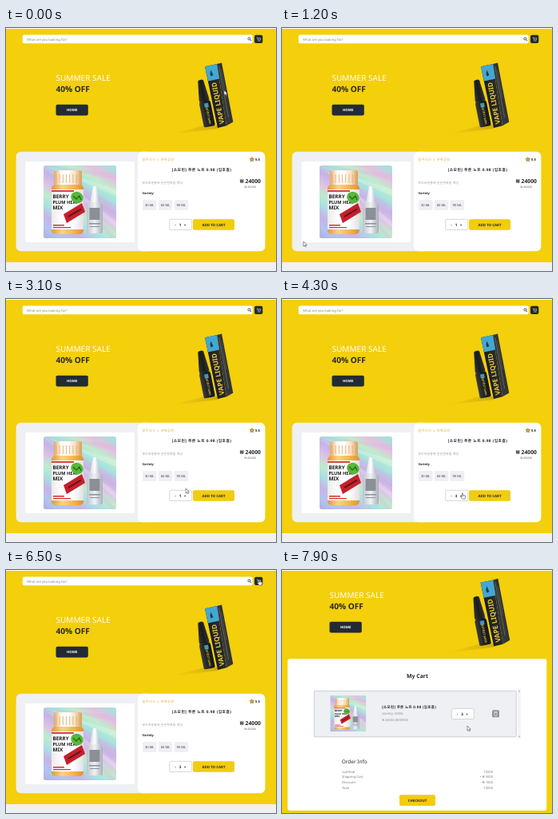
An HTML page with a canvas for the animation above (8 s loop, 338x304 px).

```html
<!DOCTYPE html>
<html lang="ko">
<head>
<meta charset="utf-8">
<title>Shop demo</title>
<style>
html, body { margin: 0; width: 338px; height: 304px; overflow: hidden; background: #fff; }
canvas { display: block; width: 338px; height: 304px; }
</style>
</head>
<body>
<canvas id="stage"></canvas>
<script>
const W = 338, H = 304, LOOP = 8000;
const CART_AT = 6800, SCROLL_FROM = 7300, SCROLL_TO = 7650, SCROLL = 31;
const FONT = '"Noto Sans", "Noto Sans CJK KR", "Noto Sans CJK", sans-serif';
const YELLOW = '#f3cf0c', DARK = '#222a35', PANEL = '#eef0f3', GREY = '#8d9097';
const TITLE = '[소모린] 푸른 노트 0.98 (입호흡)';

const canvas = document.getElementById('stage');
const dpr = window.devicePixelRatio || 1;
canvas.width = W * dpr;
canvas.height = H * dpr;
const c = canvas.getContext('2d');

// Pointer path: time, x, y
const PATH = [
  [0, 273, 78], [100, 273, 78], [800, 24, 268], [1250, 27, 267], [1500, 5, 289],
  [1600, 3, 296], [1800, 58, 286], [2300, 140, 285], [2700, 206, 258],
  [3000, 225, 237], [3150, 225, 237], [3350, 226, 243], [4500, 226, 243],
  [4900, 264, 244], [5500, 264, 244], [6200, 317, 12], [6900, 317, 12],
  [7500, 232, 195], [8000, 232, 195]
];

const ease = k => k * k * (3 - 2 * k);
const clamp = (v, a, b) => Math.max(a, Math.min(b, v));
const progress = (t, a, b) => ease(clamp((t - a) / (b - a), 0, 1));

function pointer(t) {
  let i = 0;
  while (i < PATH.length - 2 && t >= PATH[i + 1][0]) i++;
  const [a, x, y] = PATH[i], [b, x2, y2] = PATH[i + 1];
  const k = progress(t, a, b);
  return { x: x + (x2 - x) * k, y: y + (y2 - y) * k };
}

const inside = (p, x, y, w, h) => p.x >= x && p.x <= x + w && p.y >= y && p.y <= y + h;

function box(x, y, w, h, r, fill, stroke, line = 0.6) {
  c.beginPath();
  c.roundRect(x, y, w, h, r);
  if (fill) { c.fillStyle = fill; c.fill(); }
  if (stroke) { c.strokeStyle = stroke; c.lineWidth = line; c.stroke(); }
}

function poly(points, fill, stroke, line = 0.6) {
  c.beginPath();
  points.forEach(([x, y]) => c.lineTo(x, y));
  c.closePath();
  if (fill) { c.fillStyle = fill; c.fill(); }
  if (stroke) { c.strokeStyle = stroke; c.lineWidth = line; c.stroke(); }
}

function path(points, color, line) {
  c.beginPath();
  points.forEach(([x, y]) => c.lineTo(x, y));
  c.strokeStyle = color;
  c.lineWidth = line;
  c.stroke();
}

// y is the vertical middle of the capitals
function text(s, x, y, size, color, weight = 400, align = 'left', spacing = 0) {
  c.font = `${weight} ${size}px ${FONT}`;
  c.letterSpacing = spacing + 'px';
  c.textAlign = align;
  c.textBaseline = 'alphabetic';
  c.fillStyle = color;
  c.fillText(s, x, y + size * 0.357);
  c.letterSpacing = '0px';
}

function gradient(x, y, x2, y2, colors) {
  const g = c.createLinearGradient(x, y, x2, y2);
  colors.forEach((color, i) => g.addColorStop(i / (colors.length - 1), color));
  return g;
}

function button(label, x, y, w, fill, color) {
  box(x, y, w, 13.6, 1.8, fill);
  text(label, x + w / 2, y + 6.9, 4.4, color, 700, 'center');
}

function header(x, right) {
  box(x, 8.6, right - 12.6 - x, 10.6, 2, '#fff');
  text('What are you looking for?', x + 5.3, 14.4, 4.2, '#858585');
  const mx = right - 16.9;
  c.beginPath();
  c.arc(mx, 13.4, 1.5, 0, 7);
  c.strokeStyle = '#222';
  c.lineWidth = 0.8;
  c.stroke();
  path([[mx + 1.1, 14.5], [mx + 2.6, 16]], '#222', 0.9);
  const bx = right - 10.3;
  box(bx, 8.8, 10.3, 10.3, 2, DARK);
  path([[bx + 2.8, 12], [bx + 3.9, 12], [bx + 4.6, 15.1], [bx + 7.2, 15.1],
    [bx + 7.8, 12.8], [bx + 4.2, 12.8]], '#f0e4b0', 0.6);
  c.fillStyle = '#f0e4b0';
  c.fillRect(bx + 4.5, 15.8, 0.8, 0.8);
  c.fillRect(bx + 6.5, 15.8, 0.8, 0.8);
}

function bottles() {
  // Soft shadow on the ground
  poly([[206, 133], [252, 121], [270, 122], [264, 126]],
    gradient(208, 132, 264, 122, ['rgba(190,150,0,0)', 'rgba(160,120,0,.4)']));
  // Carton: front, side, blue top
  poly([[249, 48.3], [264, 45], [276, 122.3], [265, 125]],
    gradient(252, 90, 272, 86, ['#17191c', '#2b2d2e']));
  poly([[264, 45], [270, 43.5], [284.3, 117.5], [276, 122.3]],
    gradient(266, 80, 280, 77, ['#3a3c3a', '#2c2e2f']));
  poly([[249, 48.3], [264, 45], [267, 63.5], [253, 66.5]], '#43a7d4');
  poly([[256.5, 52.5], [258, 56], [259.5, 59], [256.5, 60.5], [255.5, 57]], '#1f3a48');
  path([[266.6, 48], [278.6, 112]], '#777668', 0.7);
  path([[269.5, 52], [276, 88]], '#61615a', 0.6);
  c.save();
  c.translate(270.3, 120);
  c.rotate(-1.765);
  text('VAPE LIQUID', 0, 0, 8.3, '#ecca38', 700);
  c.restore();
  // Dropper bottle
  c.save();
  c.translate(243, 65);
  c.rotate(-0.2);
  poly([[-3, 1], [-1, 0], [2, 0], [4, 1], [6.3, 24], [6.3, 27], [-6.3, 27], [-6.3, 24]],
    gradient(-6, 0, 6, 0, ['#33342f', '#191b1d', '#303230']));
  box(-7, 26.5, 14.3, 33, [4, 4, 2, 2], gradient(-7, 0, 7, 0, ['#3d3e38', '#1c1f22', '#15181b']));
  c.fillStyle = '#4296ba';
  c.fillRect(-1, 30, 5, 5);
  c.rotate(-Math.PI / 2);
  text('VAPE LIQUID', -57, 1.3, 3.6, '#dcbf3a', 700);
  c.restore();
}

// Product picture drawn on a 91 x 91 field
function product(x, y, size) {
  c.save();
  c.translate(x, y);
  c.scale(size / 91, size / 91);
  c.beginPath();
  c.roundRect(0, 0, 91, 91, 2.5);
  c.clip();
  c.fillStyle = gradient(14, 98, 74, -4, ['#b0b0e4', '#b4c4ee', '#c8b4e6', '#a9dfe4', '#bdeccb',
    '#dcc3e6', '#c9b2e6', '#a6e2de', '#c0eccb', '#e4c0e0', '#a9dfdc']);
  c.fillRect(0, 0, 91, 91);
  c.globalAlpha = 0.22;
  for (let i = 0; i < 5; i++) {
    const b = 10 + i * 20;
    poly([[0, 0], [91, b], [91, b + 8]], i % 2 ? '#fff' : '#e89fe0');
  }
  c.globalAlpha = 1;

  // Jar
  box(13, 6, 35, 20, 3, gradient(13, 0, 48, 0, ['#e0a868', '#fffaf0', '#fff', '#f6e2c8', '#dd9c55']));
  c.fillStyle = '#e3a763';
  for (let i = 0; i < 8; i++) c.fillRect(15.5 + i * 4.2, 11, 0.8, 11);
  box(10, 24, 40, 62, 5, gradient(10, 0, 50, 0, ['#e09a35', '#f7d48a', '#f3b94f', '#e0912c']));
  c.fillStyle = gradient(10, 0, 50, 0, ['#eeeaea', '#fff', '#fff', '#e2e0e4']);
  c.fillRect(10, 30, 40, 50);
  c.fillStyle = '#cf2f2d';
  c.fillRect(10, 31, 28, 1.8);
  c.fillRect(12, 74, 14, 1.5);
  c.fillRect(12, 77, 22, 1.2);
  text('BERRY', 11.5, 39, 6.4, '#1c1c1c', 800);
  text('PLUM HEAT', 11.5, 46, 5.6, '#1c1c1c', 800);
  text('MIX', 11.5, 53, 6.4, '#1c1c1c', 800);
  c.fillStyle = '#58b83a';
  c.beginPath();
  c.ellipse(42, 40, 8, 7, 0.5, 0, 7);
  c.fill();
  path([[37, 38], [41, 42], [45, 38], [47, 43]], '#28661f', 1.2);
  poly([[25, 61], [48, 47], [52, 58], [29, 72]], '#c71f2b');
  path([[31, 64], [47, 54.5]], '#501620', 2);

  // Vial
  poly([[62, 26], [66, 26], [70, 47], [58, 47]],
    gradient(58, 0, 70, 0, ['#d3d8de', '#fff', '#b9c0c9']));
  box(54, 46, 20, 39, [5, 5, 2, 2], gradient(54, 0, 74, 0, ['#bdc3cd', '#f1f2f5', '#a9aeb9']));
  c.fillStyle = '#8b9097';
  c.fillRect(57.5, 53, 13, 15);
  c.fillStyle = '#8d929b';
  c.fillRect(57, 72, 14, 1.5);
  c.fillRect(58, 76, 12, 1);
  c.restore();
}

function quantity(x, y, n) {
  box(x + 0.3, y + 0.3, 28, 13.2, 1.8, '#fff', '#b9bcc2');
  text('-', x + 7.6, y + 7, 4.6, '#222', 700, 'center');
  text(n, x + 13.6, y + 7, 4.6, '#222', 700, 'center');
  text('+', x + 19.6, y + 7, 4.6, '#222', 700, 'center');
}

function hero(x, zoom) {
  text('SUMMER SALE', x, 62.4, 10.05, '#fffdf2', 500);
  text('40% OFF', x, 76, 10.1, '#2a2a1e', 700);
  button('HOME', x, 95.8, 40.3, DARK, '#fff');
  c.save();
  c.translate(260, 85);
  c.scale(zoom, zoom);
  c.translate(-260, -85);
  bottles();
  c.restore();
}

function star(x, y) {
  const points = [];
  for (let i = 0; i < 10; i++) {
    const r = i % 2 ? 1.3 : 2.8, a = i * Math.PI / 5 - Math.PI / 2;
    points.push([x + r * Math.cos(a), y + r * Math.sin(a)]);
  }
  poly(points, '#eeb71b', '#6b531a', 0.6);
}

function shopPage(n, hover) {
  c.fillStyle = YELLOW;
  c.fillRect(0, 1, W, 292);
  c.fillStyle = '#f1f1f1';
  c.fillRect(0, 293, W, 11);
  header(20.7, 321.3);
  hero(62.5, 1);

  box(12.6, 154.8, 170, 124.5, 6, PANEL);
  c.fillStyle = '#fff';
  c.fillRect(24.5, 167, 136.5, 101);
  product(47, 172, 91);
  box(165, 154.8, 159.4, 124.5, 6, '#fff');

  text('달무리스 x 새벽공방', 170.5, 164.5, 4.2, '#d9b02c', 500, 'left', 0.45);
  star(307.8, 164.5);
  text('5.5', 312, 164.7, 4.2, '#222', 700);
  text(TITLE, 245, 177.5, 4.8, '#20252d', 700, 'center', 0.43);
  text('부드러운향과 은은한과일 액상', 170.5, 194, 3.8, '#909090', 400, 'left', 0.22);
  text('₩ 24000', 319, 191.6, 6.8, '#20252d', 700, 'right');
  text('₩ 30000', 313, 199, 3.8, GREY, 400, 'right');
  path([[298, 199.2], [313, 199.2]], GREY, 0.4);
  text('Variety', 170.5, 207, 4, '#222', 700);
  ['30 ML', '60 ML', '90 ML'].forEach((s, i) => {
    const x = 171 + i * 19.8;
    box(x, 215, 17.5, 13, 1.5, PANEL);
    text(s, x + 8.7, 221.7, 4.1, '#3b414b', 400, 'center');
  });
  quantity(204.4, 239, n);
  button('ADD TO CART', 234, 239.2, 52, hover ? '#f5dc50' : '#f1cc10', '#2b2a1c');
}

function row(label, value, y) {
  text(label, 75, y, 4.1, '#777b82');
  text(value, 264, y, 4.1, '#777b82', 400, 'right');
}

function cartPage() {
  c.fillStyle = YELLOW;
  c.fillRect(0, 0, W, 360);
  header(17.5, 324.8);
  hero(59.5, 1.04);
  box(7, 142, 324.3, 190, 3, '#fff');
  text('My Cart', 169.5, 163.4, 6.9, '#20252d', 700, 'center');

  box(40.3, 182.3, 253, 57.5, 1, PANEL, '#b8bdc6', 0.7);
  c.fillStyle = '#f4f4f4';
  c.fillRect(295, 180, 4, 62);
  poly([[296, 183.2], [297, 181.8], [298, 183.2]], '#8f8f8f');
  poly([[296, 238.8], [297, 240.2], [298, 238.8]], '#8f8f8f');
  product(60.3, 188, 45);
  text(TITLE, 125.3, 202.8, 4.5, '#20252d', 700, 'left', 0.3);
  text('Variety: 30ML', 125.3, 211, 4.2, GREY);
  text('₩ 24000 (₩30000)', 125.3, 218.7, 4, GREY);
  quantity(212, 204, 3);
  box(263, 206.2, 9, 9, 1.5, '#8f949d');
  box(265.9, 209.4, 3.2, 3.9, 0.4, null, '#fff', 0.6);
  path([[265.2, 208.6], [269.8, 208.6]], '#fff', 0.6);

  text('Order Info', 74.7, 270.3, 6.5, '#2a2f37');
  row('subTotal', '72000', 283.2);
  row('Shipping Cost', '+ ₩ 3000', 290);
  row('Discount', '- ₩ 1000', 296.7);
  row('Total', '74000', 303.4);
  button('CHECKOUT', 147, 312.3, 45, '#f1cc10', '#2b2a1c');
}

function arrow() {
  poly([[0, 0], [0, 6.8], [1.6, 5.4], [2.7, 7.7], [3.8, 7.2], [2.8, 5], [4.9, 4.9]],
    '#fff', '#333', 0.6);
}

function hand() {
  poly([[-0.8, 0], [0.5, 0], [0.7, 2.8], [3.9, 3.5], [4.3, 5], [3.5, 8], [-0.4, 8],
    [-2.8, 4.7], [-2, 4.1], [-0.8, 5.1]], '#fff', '#333', 0.6);
  path([[0.9, 3], [0.9, 4.5]], '#555', 0.4);
  path([[2.3, 3.3], [2.3, 4.6]], '#555', 0.4);
}

function draw(t) {
  const p = pointer(t), inCart = t >= CART_AT;
  const onAdd = !inCart && inside(p, 234, 239, 52, 14);
  const onPlus = !inCart && inside(p, 221, 239, 12, 14);
  const onBag = inside(p, 311, 9, 13, 10.5);

  c.setTransform(dpr, 0, 0, dpr, 0, 0);
  c.lineJoin = 'round';
  c.textRendering = 'geometricPrecision';
  c.fillStyle = '#fff';
  c.fillRect(0, 0, W, H);
  if (inCart) {
    c.save();
    c.translate(0, -SCROLL * progress(t, SCROLL_FROM, SCROLL_TO));
    cartPage();
    c.restore();
    c.fillStyle = '#fff';
    c.fillRect(0, 0, W, 1);
  } else {
    shopPage(t < 3600 ? 1 : t < 4000 ? 2 : 3, onAdd);
  }
  c.translate(p.x, p.y);
  c.scale(0.88, 0.88);
  (onAdd || onPlus || onBag ? hand : arrow)();
}

const start = performance.now();
function tick() {
  draw((performance.now() - start) % LOOP);
  requestAnimationFrame(tick);
}
tick();
</script>
</body>
</html>
```
